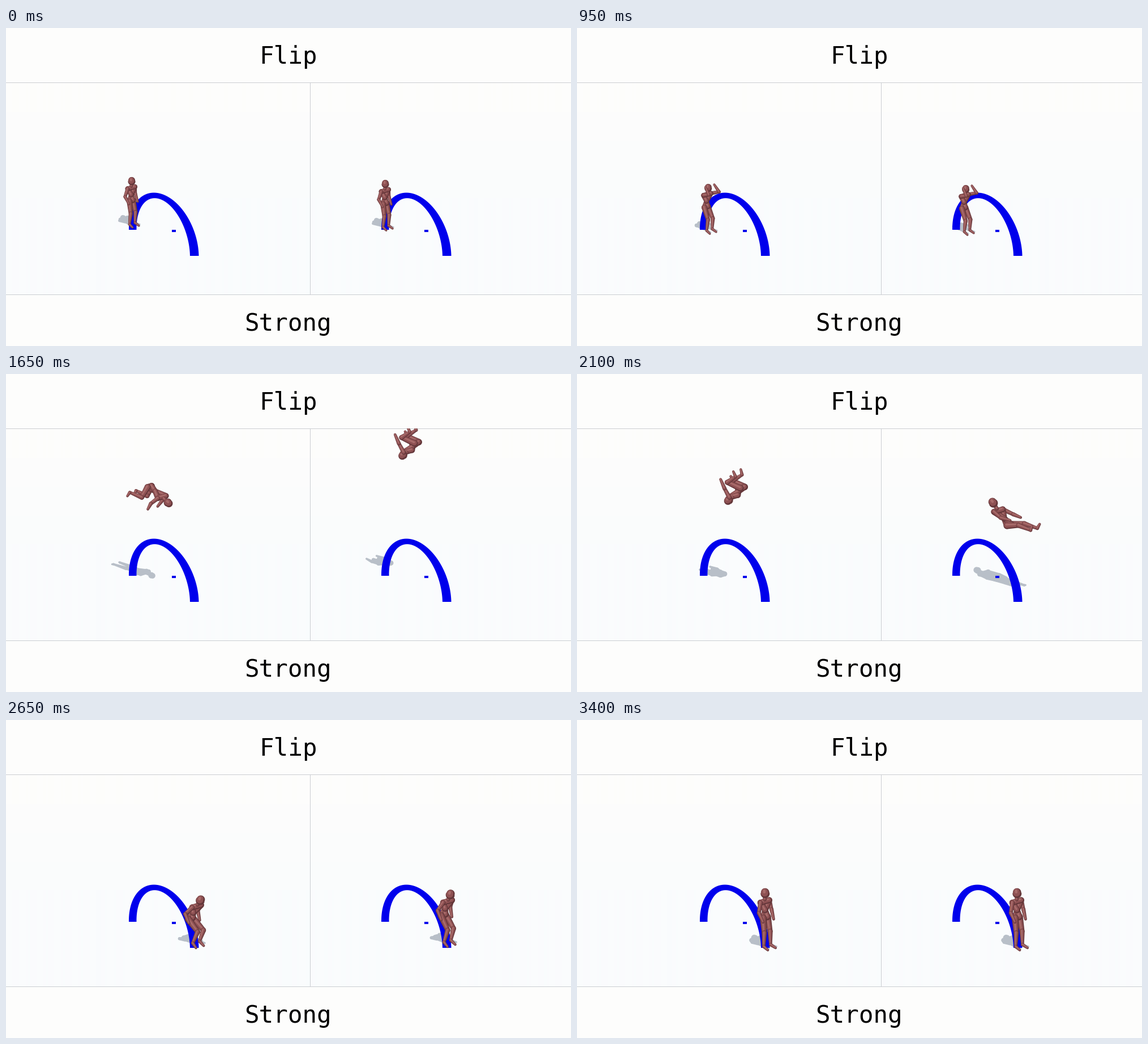
Animation, 998 px wide and 561 px high, one loop 3450 ms. Source, as a matplotlib script:

```python
import numpy as np
import matplotlib.pyplot as plt
from matplotlib.animation import FuncAnimation
from matplotlib.collections import PolyCollection
from matplotlib.patches import Polygon, Rectangle

W, H = 998, 561
FRAMES, STEP = 69, 50
TOP, BOTTOM, SPLIT = 95.5, 470, 537.5

# Screen directions of the scene's axes (y points down)
FORWARD, SIDE, UP = 0.87 + 0.3j, -0.7 + 0.2j, -0.93j
SHADOW = -0.2 - 0.13j


def rgb(*c):
    return tuple(v / 255 for v in c)


# Degrees: torso lean, arm raise, elbow bend, hip bend, knee bend.
# The lean grows through one full turn.
STAND = (0, -8, 35, 10, 15)
CROUCH = (5, 120, 100, 28, 28)
JUMP = (8, 165, 20, 5, 10)
TUCK = (115, 75, 10, 90, 70)
BALL = (219, 60, 15, 122, 130)
SIT = (311, 36, 20, 89, 65)
REACH = (313, 28, 15, 63, 22)
DIP = (385, -10, 55, 75, 70)
LAND = (373, -7, 50, 58, 55)
END = (358, 0, 20, 6, 8)

LEFT = dict(
    keys={0: STAND, 400: STAND, 950: CROUCH, 1200: JUMP, 1650: TUCK,
          2100: BALL, 2400: SIT, 2650: DIP, 2950: LAND, 3400: END},
    takeoff=1200, landing=2650, rise=146,
    feet=(223 + 345j, 234 + 356j, 336 + 392j, 336 + 398j))
RIGHT = dict(
    keys={0: STAND, 400: STAND, 950: CROUCH, 1080: JUMP, 1380: TUCK,
          1650: BALL, 2100: REACH, 2200: LAND, 2400: DIP, 2950: END,
          3400: END},
    takeoff=1080, landing=2200, rise=205,
    feet=(671 + 350j, 689 + 358j, 778 + 379j, 781 + 398j))

# Joint numbers: head 0, crown 1, neck 2, waist 3, then per side
# shoulder, elbow, hand, hip, knee, ankle, toe.
A, B = 4, 11
WIDTHS = np.array([9, 13, 11, 4.5, 6, 7, 8])


def arm(s):
    return [(s, s + 1, 3.4, 2.7), (s + 1, s + 2, 3.0, 2.0)]


def leg(s):
    return [(s + 3, s + 4, 5.0, 3.6), (s + 4, s + 5, 3.7, 2.2),
            (s + 5, s + 6, 2.5, 1.8)]


# from joint, to joint, radius at each end; far limbs first
PARTS = (arm(B) + leg(B)
         + [(A + 3, B + 3, 4.8, 4.8), (3, A + 3, 4.2, 4.4),
            (3, B + 3, 4.2, 4.4), (B, 3, 4.5, 4.2), (A, 3, 4.5, 4.2),
            (A, B, 4.2, 4.2), (0, 2, 3.0, 2.8)]
         + leg(A) + [(0, 1, 6.6, 6.0)] + arm(A))

# radius factor, offset, colour
SHADES = [
    (1.0, 0, rgb(100, 55, 58)),
    (0.78, -0.12 - 0.16j, rgb(142, 81, 83)),
    (0.3, -0.2 - 0.35j, rgb(168, 107, 106)),
]


def ray(a):
    """Unit step in the body's side plane: real forward, imaginary up."""
    return 1j * np.exp(-1j * a)


def skeleton(pose):
    lean, raise_, elbow, hip, knee = np.radians(pose)
    down = lean + np.pi
    neck = 28 * ray(lean)
    head = neck + 9 * ray(lean + 0.1)
    el = 0.88 * neck + 15 * ray(down - raise_)
    hand = el + 14 * ray(down - raise_ - elbow)
    kn = 22 * ray(down - hip)
    ankle = kn + 21 * ray(down - hip + knee)
    toe = ankle + 8 * ray(down - hip + knee - 1.2)
    side = [0.88 * neck, el, hand, 0, kn, ankle, toe]
    z = np.array([head, head + 2 * ray(lean), neck, 0.4 * neck]
                 + side + side)
    return z, np.r_[np.zeros(4), WIDTHS, -WIDTHS]


def project(z, lateral, up):
    return z.real * FORWARD + lateral * SIDE + z.imag * up


def ease(u):
    u = u ** 1.15
    return u * u * (3 - 2 * u)


def xy(z):
    return np.column_stack([z.real, z.imag])


ARC = np.exp(1j * np.linspace(-np.pi / 2, np.pi / 2, 10))


def capsule(p, q, rp, rq):
    d = q - p
    d = d / abs(d) if abs(d) > 1e-6 else 1
    return np.r_[q + rq * d * ARC, p - rp * d * ARC]


class Dancer:
    def __init__(self, ax, clip, keys, takeoff, landing, rise, feet):
        self.times = np.array(list(keys), float)
        self.poses = np.array(list(keys.values()), float)
        self.slopes = np.gradient(self.poses, self.times, axis=0)
        self.takeoff, self.landing, self.rise = takeoff, landing, rise
        self.feet = feet
        self.shadow = PolyCollection([], facecolors=[rgb(184, 191, 200)],
                                     edgecolors="none", zorder=2)
        self.body = PolyCollection([], edgecolors="none", zorder=4,
                                   facecolors=[s[2] for s in SHADES]
                                   * len(PARTS))
        for art in (self.shadow, self.body):
            ax.add_collection(art, autolim=False)
            art.set_clip_path(clip)

    def pose(self, t):
        k = int(np.clip(np.searchsorted(self.times, t, side="right") - 1,
                        0, len(self.times) - 2))
        d = self.times[k + 1] - self.times[k]
        u = (t - self.times[k]) / d
        a = u * u * (3 - 2 * u)
        bend = self.slopes[k] * (1 - u) - self.slopes[k + 1] * u
        return (self.poses[k] * (1 - a) + self.poses[k + 1] * a
                + d * u * (1 - u) * bend)

    def progress(self, t):
        return np.clip((t - self.takeoff) / (self.landing - self.takeoff),
                       0, 1)

    def size(self, t):
        return 1 + 0.22 * self.progress(t) ** 0.5

    def grounded(self, t):
        """Pelvis and the floor point below it, with the feet planted."""
        z, lateral = skeleton(self.pose(t))
        size = self.size(t)
        ankle = z[A + 5]
        foot = project(ankle, 0, UP)
        spot = np.interp(t, [0, 950, self.landing, 2950], self.feet)
        if t <= self.takeoff:
            spot = np.interp(t, [0, 950], self.feet[:2])
        return spot - size * foot, spot - size * ankle.real * FORWARD

    def place(self, t):
        u = self.progress(t)
        if u in (0, 1):
            return self.grounded(t)
        (p0, g0), (p1, g1) = map(self.grounded, (self.takeoff, self.landing))
        e = ease(u)
        lift = 4 * self.rise * u * (1 - u)
        return p0 + (p1 - p0) * e - 1j * lift, g0 + (g1 - g0) * e

    def update(self, t):
        z, lateral = skeleton(self.pose(t))
        size = self.size(t)
        pelvis, floor = self.place(t)
        solid = pelvis + size * project(z, lateral, UP)
        cast = floor + SHADOW * (floor - pelvis).imag
        flat = cast + size * project(z, lateral, SHADOW)
        body, dark = [], []
        for i, j, ri, rj in PARTS:
            ri, rj = ri * size, rj * size
            for f, off, _ in SHADES:
                shift = off * (ri + rj) / 2
                body.append(xy(capsule(solid[i] + shift, solid[j] + shift,
                                       ri * f, rj * f)))
            dark.append(xy(capsule(flat[i], flat[j], ri * 0.75, rj * 0.75)))
        self.body.set_verts(body)
        self.shadow.set_verts(dark)


def half_ring(left, right, height):
    """Half circle standing on two floor points, seen in perspective."""
    a = np.linspace(np.pi, 0, 80)
    p, q = 1.1 * left, 0.9 * right
    z = (p + q) / 2 + (q - p) / 2 * np.cos(a)
    z = z - (1.5 + 1j * height) * np.sin(a)
    return z / (1 - 0.1 * np.cos(a))


ARCH = np.r_[half_ring(217 + 356j, 340.5 + 402j, 85),
             half_ring(230.5 + 356j, 325 + 402j, 75)[::-1]]
BLUE = rgb(0, 0, 236)

fig = plt.figure(figsize=(W / 100, H / 100), dpi=100,
                 facecolor=rgb(253, 253, 252))
ax = fig.add_axes([0, 0, 1, 1])
ax.axis("off")

# Pale floor fading in below the horizon
fade = np.clip((np.arange(TOP, BOTTOM) - 150) / 150, 0, 1)[:, None, None]
sky, ground = np.array(rgb(253, 253, 252)), np.array(rgb(250, 252, 253))
ax.imshow(sky + (ground - sky) * fade, extent=(0, W, BOTTOM, TOP),
          aspect="auto", interpolation="bilinear", zorder=0)
ax.set_xlim(0, W)
ax.set_ylim(H, 0)

for xs, ys in [((0, W), (TOP, TOP)), ((0, W), (BOTTOM, BOTTOM)),
               ((SPLIT, SPLIT), (TOP, BOTTOM))]:
    ax.plot(xs, ys, color=rgb(203, 206, 210), lw=0.72, zorder=1)

for word, base in (("Flip", 62.6), ("Strong", 533.6)):
    ax.text(498, base, word, family="DejaVu Sans Mono", fontsize=30.6,
            color="black", ha="center", va="baseline")

for dx in (0, 446):
    ax.add_patch(Polygon(xy(ARCH + dx), fc=BLUE, ec="none", zorder=3))
    ax.add_patch(Rectangle((293.5 + dx, 356), 6.5, 3.5,
                           fc=BLUE, ec="none", zorder=3))

dancers = []
for act, x0, x1 in ((LEFT, 0, SPLIT), (RIGHT, SPLIT, W)):
    clip = Rectangle((x0, TOP), x1 - x0, BOTTOM - TOP,
                     transform=ax.transData)
    dancers.append(Dancer(ax, clip, **act))


def draw(i):
    for d in dancers:
        d.update(i * STEP)
    return [a for d in dancers for a in (d.shadow, d.body)]


anim = FuncAnimation(fig, draw, frames=FRAMES, interval=STEP, repeat=True,
                     repeat_delay=0, blit=False)
plt.show()
```
